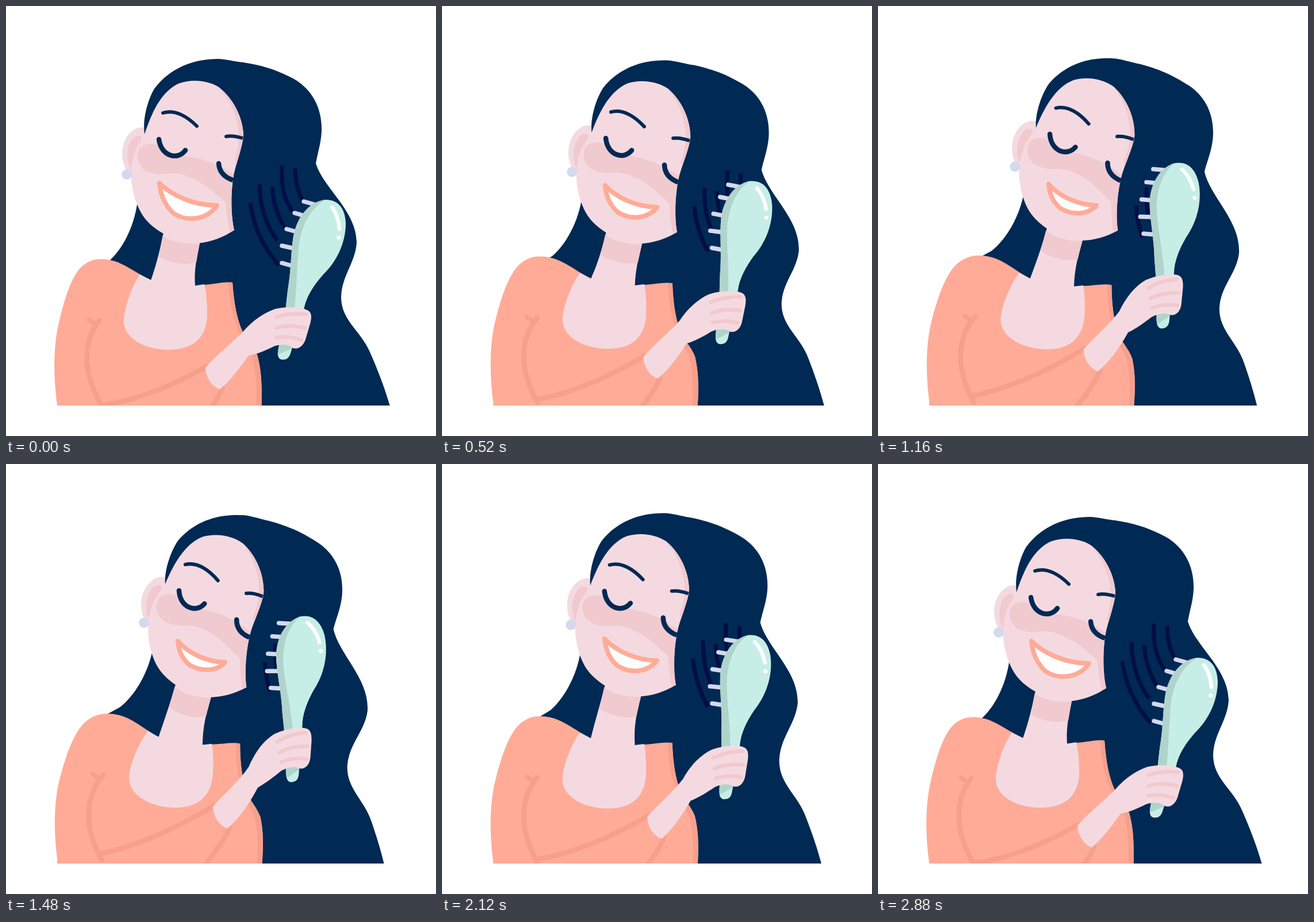
Recreate the animation shown at these times as an HTML page. Size 748 by 748 pixels, loop 2920 ms.

```html
<!DOCTYPE html>
<html lang="en">
<head>
<meta charset="utf-8">
<title>Brushing hair</title>
<style>
html, body { margin: 0; width: 100%; height: 100%; overflow: hidden; background: #fff; }
svg { display: block; width: 100vw; height: 100vh; }
</style>
</head>
<body>
<svg id="stage" viewBox="0 0 748 748">
  <defs><clipPath id="floor"><rect width="748" height="695"/></clipPath></defs>
  <g id="art" clip-path="url(#floor)" fill="none" stroke-linejoin="round"></g>
</svg>
<script>
const NS = 'http://www.w3.org/2000/svg';
const art = document.getElementById('art');
const HAIR = '#002954', SKIN = '#f4dae0', BLUSH = '#f0cacf', SHIRT = '#ffab98', FOLD = '#f6a08c',
      MINT = '#c6eee6', MINT_SHADE = '#b0d3cc', LILAC = '#d4d9ee', STRAND = '#000e46';

// Motion tracks, sampled at KEYS and joined by monotone cubic curves
const LOOP = 2920, STEP = 40;
const KEYS = [0, 520, 840, 1480, 2120, 2560, 2880];
const TRACKS = {
  sway:   [0, .52, .79, 1, .5, .17, 0],
  lift:   [0, 1, .8, 0, -1, -.6, 0],
  brushX: [482, 486, 491, 499, 493, 488, 482],
  brushY: [615, 588, 574, 553, 583, 606, 615],
  tilt:   [0, -5, -8.3, -12.5, -7.2, -3.4, 0]
};
const pose = {};

function sample(v, t) {
  const n = KEYS.length - 1;
  let i = 0;
  while (i < n - 1 && t >= KEYS[i + 1]) i++;
  const slope = k => (v[k + 1] - v[k]) / (KEYS[k + 1] - KEYS[k]);
  const tangent = k => {
    const a = slope((k + n - 1) % n), b = slope(k % n);
    return a * b <= 0 ? 0 : 2 * a * b / (a + b);
  };
  const h = KEYS[i + 1] - KEYS[i], u = Math.min(1, (t - KEYS[i]) / h), w = 1 - u;
  return v[i] * w * w * (1 + 2 * u) + v[i + 1] * u * u * (3 - 2 * u)
       + h * u * w * (tangent(i) * w - tangent(i + 1) * u);
}

// Warps: each maps a rest point to its place in the current pose
const clamp = x => Math.max(0, Math.min(1, x));
function rotate(x, y, deg, cx, cy) {
  const r = deg * Math.PI / 180, c = Math.cos(r), s = Math.sin(r);
  return [cx + (x - cx) * c - (y - cy) * s, cy + (x - cx) * s + (y - cy) * c];
}
function head(x, y) {
  const { sway, lift } = pose, loose = clamp((560 - y) / 140), face = clamp((490 - x) / 80);
  const [a, b] = rotate(x, y, 4.8 * sway, 395, 645);
  return [a + lift * (2.5 - 1.7 * loose), b + (4.5 * lift - 2.5 * sway * face) * loose];
}
function body(x, y) {
  const p = pose.sway;
  return [x + .06 * p * (700 - y) * clamp((x - 60) / 130),
          y + .05 * p * (Math.max(x, 165) - 290) - 1.5 * pose.lift];
}
function brush(x, y) {
  const [a, b] = rotate(x, y, pose.tilt, 482, 615);
  return [a + pose.brushX - 482, b + pose.brushY - 615];
}
function sleeve(x, y) {
  const w = clamp((x - 165) / 180), { sway, lift } = pose;
  return [x + (13 * sway - 3.5 * lift) * w, y - (17 + 16 * w) * sway - 1.5 * lift];
}
function arm(x, y) {
  const u = clamp((x - 372) / 73), w = u * u * (3 - 2 * u);
  const a = sleeve(x, y), b = brush(x, y);
  return [a[0] + (b[0] - a[0]) * w, a[1] + (b[1] - a[1]) * w];
}
const warp = (d, fn) => d.replace(/(-?[\d.]+),(-?[\d.]+)/g,
  (_, x, y) => fn(+x, +y).map(v => v.toFixed(2)).join());

const updates = [];
function add(tag, attrs) {
  const el = document.createElementNS(NS, tag);
  for (const k in attrs) el.setAttribute(k, attrs[k]);
  return art.appendChild(el);
}
function shape(fn, d, attrs) {
  const el = add('path', attrs);
  updates.push(() => el.setAttribute('d', warp(d, fn)));
  return el;
}
const fill = (fn, color, d) => shape(fn, d, { fill: color });
const line = (fn, color, width, d, cap = 'round') =>
  shape(fn, d, { stroke: color, 'stroke-width': width, 'stroke-linecap': cap });
function dot(fn, color, x, y, r) {
  const el = add('circle', { fill: color, r });
  updates.push(() => {
    const [cx, cy] = fn(x, y);
    el.setAttribute('cx', cx);
    el.setAttribute('cy', cy);
  });
}

// Ear and hair
fill(head, SKIN, 'M246,213 C226,204 203,225 202,255 C202,272 207,285 214,290 L235,295 Z');
fill(head, BLUSH, 'M235,227 C222,220 211,240 211,262 C212,275 215,285 219,287 C222,265 228,247 234,240 C236,236 236,228 235,227 Z');
fill(head, HAIR, 'M241,223 C237,195 248,160 258,144 C285,108 325,92 370,92 C385,93 400,97 412,98 ' +
  'C432,101 448,105 463,110 C477,115 490,121 501,127 C536,147 550,182 549,217 C548,240 542,255 539,274 ' +
  'C553,318 609,355 610,411 C608,447 583,470 583,508 C584,548 618,566 633,602 C647,634 658,662 667,693 ' +
  'L678,728 L300,740 L150,462 L181,442 C203,422 222,385 228,345 L260,300 Z');

// Strands shorten to the height of the bristle tips
const bristles = [
  [518, 340, 536, 345], [502, 360, 519, 365], [488, 388, 506, 393], [480, 417, 498, 421], [480, 447, 498, 452]
];
const strands = [
  'M503,282 C503,305 508,325 518,342', 'M480,278 C478,315 484,340 502,362', 'M463,315 C465,345 474,370 488,390',
  'M441,310 C442,350 452,382 472,408', 'M425,343 C430,380 446,420 475,451'
];
strands.forEach((d, i) => {
  const el = line(head, STRAND, 7, d, 'butt');
  el.setAttribute('pathLength', 1);
  const pts = d.match(/[\d.]+,[\d.]+/g).map(s => s.split(',').map(Number));
  updates.push(() => {
    const top = head(...pts[0])[1], end = head(...pts[3])[1];
    const tip = brush(bristles[i][0], bristles[i][1])[1] + 3;
    const shown = clamp((tip - top) / (end - top));
    el.setAttribute('stroke-dasharray', shown + ' 2');
    el.setAttribute('visibility', shown > 0 ? 'visible' : 'hidden');
  });
});

// Neck joins the head to the shoulders
const neck = add('path', { fill: SKIN });
updates.push(() => neck.setAttribute('d',
  warp('M274,395 L272,402 C268,425 260,455 ', head) +
  warp('252,477 L290,520 L329,488 L329,486 ', body) +
  warp('C327,462 331,440 337,413 L330,395 Z', head)));
fill(head, BLUSH, 'M273,400 C290,412 320,416 337,412 L331,446 C310,452 284,446 266,436 Z');

// Face
fill(head, SKIN, 'M241,223 C252,190 268,150 300,135 C325,126 352,130 370,141 C395,160 411,192 413,222 ' +
  'C413,240 403,265 397,290 C391,320 390,360 397,390 C378,402 358,411 330,413 C298,412 255,392 237,363 ' +
  'C221,337 214,300 219,275 C222,250 235,235 241,223 Z');
fill(head, BLUSH, 'M368,140 C395,160 411,192 413,222 C413,236 406,258 401,275 L398,268 C403,250 405,240 405,225 C404,195 390,162 368,140 Z');
fill(head, BLUSH, 'M229,264 C227,246 240,239 255,240 C268,240 278,252 297,260 C330,262 362,270 396,293 ' +
  'C391,320 391,365 397,390 L390,393 C384,375 384,355 381,340 C372,334 362,324 350,315 C330,300 305,290 285,291 C262,295 233,292 229,264 Z');
line(head, HAIR, 8.5, 'M266,232 C270,262 299,269 312,251');
line(head, HAIR, 8.5, 'M370,274 C371,288 380,298 395,303', 'butt');
dot(head, HAIR, 370, 274, 4.2);
line(head, HAIR, 6, 'M273,186 C294,179 316,193 332,209');
line(head, HAIR, 6, 'M383,227 C393,225 402,227 412,230', 'butt');
dot(head, HAIR, 383, 227, 3);
dot(head, LILAC, 210, 293, 9);

// Mouth narrows as the head leans over
const smile = [267,308, 288,330, 328,347, 367,347, 350,372, 315,376, 292,361, 275,346, 268,325, 267,308];
const smileLeaning = [299,308, 317,329, 348,344, 381,345, 365,362, 340,361, 320,350, 306,340, 300,323, 299,308];
const mouth = add('path', { fill: '#fff', stroke: SHIRT, 'stroke-width': 8 });
updates.push(() => {
  const m = smile.map((v, i) =>
    (v + (smileLeaning[i] - v) * pose.sway + (i % 2 ? 4 * pose.lift : 0)).toFixed(2));
  mouth.setAttribute('d', `M${m.slice(0, 2)}C${m.slice(2)}Z`);
});

// Shirt
fill(body, SHIRT, 'M181,442 C162,438 145,440 130,455 C110,475 96,530 89,565 C82,605 83,650 89,694 L89,735 L443,735 ' +
  'C446,670 446,640 437,607 C430,590 415,577 411,565 C400,540 396,510 394,481 C380,479 362,484 345,485 ' +
  'L329,487 L300,520 L252,477 C235,470 205,446 181,442 Z');
fill(body, FOLD, 'M387,481 L394,481 C396,510 400,540 411,565 C415,577 430,590 437,607 C446,640 446,670 443,735 ' +
  'L433,735 C438,670 436,640 427,607 C402,568 388,530 387,481 Z');
fill(body, SKIN, 'M253,477 L233,467 C220,485 205,525 205,548 C205,580 245,598 282,598 C328,598 350,575 350,535 C350,515 348,495 345,484 L329,486.5 Z');
line(body, FOLD, 9, 'M162,547 C140,575 126,625 166,695');
line(body, FOLD, 8, 'M145,546 L157,554');
line(sleeve, FOLD, 9, 'M349,627 C300,655 235,685 165,695');
line(sleeve, FOLD, 9, 'M376,664 Q370,685 335,728');

// Brush
bristles.forEach(([x1, y1, x2, y2]) => line(brush, LILAC, 7.5, `M${x1},${y1} L${x2},${y2}`));
const outline = 'M473,602 C472,611 476,616 483,615 C490,615 493,610 495,604 L519,524 C523,505 536,485 551,468 ' +
  'C577,443 591,410 591,378 C590,352 578,337 556,337 C528,340 508,366 501,395 C495,425 497,455 490,495 L486,530 Z';
fill(brush, MINT, outline);
fill(brush, MINT_SHADE, 'M556,337 C528,340 508,366 501,395 C495,425 497,455 490,495 L486,530 L473,600 L474,606 L498,596 ' +
  'L502,524 C506,490 506,450 509,420 C513,385 528,352 556,337 Z');
line(brush, '#fff', 6.5, 'M567,350 Q578,364 580,388');
dot(brush, '#fff', 579, 403, 3.6);

// Forearm and hand
fill(arm, SKIN, 'M347,629 C365,608 392,587 412,567 C428,548 448,534 468,527 C488,522 515,523 526,530 ' +
  'C532,534 532,542 529,553 L521,580 C517,592 508,598 499,595 C491,588 478,588 466,592 C450,600 436,606 422,608 ' +
  'C406,630 390,652 372,667 C357,661 348,646 347,629 Z');
line(brush, BLUSH, 6.5, 'M470,541 Q492,533 522,536');
line(brush, BLUSH, 6.5, 'M470,560 Q492,553 520,560');
line(brush, BLUSH, 6.5, 'M470,577 Q492,573 514,581');

function render(time) {
  const t = Math.floor((time % LOOP) / STEP) * STEP;
  for (const k in TRACKS) pose[k] = sample(TRACKS[k], t);
  updates.forEach(update => update());
}
const start = performance.now();
function tick() {
  render(performance.now() - start);
  requestAnimationFrame(tick);
}
tick();
</script>
</body>
</html>
```
